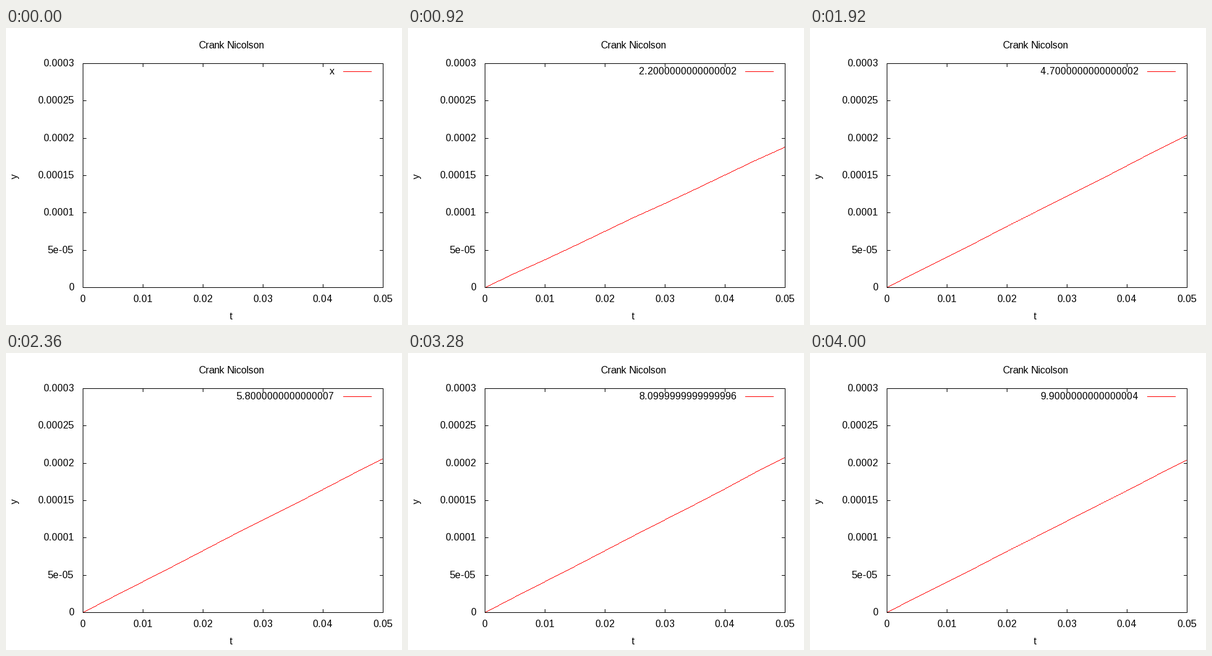
Recreate the animation shown at these times as a matplotlib script. Size 640 px wide and 480 px high, loop 4040 ms.

```python
import numpy as np
import matplotlib.pyplot as plt
from matplotlib.animation import FuncAnimation

W, H, DPI = 640, 480, 100
FRAMES, INTERVAL = 101, 40
LEFT, RIGHT, TOP, BOTTOM = 124, 609, 57, 419
PX = 72 / DPI  # one pixel in points
TICK = 5
SEGMENTS = 10

plt.rcParams.update({
    "font.family": "Liberation Sans",
    "text.hinting": "force_autohint",
    "text.hinting_factor": 1,
})
fig = plt.figure(figsize=(W / DPI, H / DPI), dpi=DPI, facecolor="white")
# Whole numbers are pixel centres, y runs down.
ax = fig.add_axes([0, 0, 1, 1])
ax.set_xlim(-0.5, W - 0.5)
ax.set_ylim(H - 0.5, -0.5)
ax.axis("off")


def line(x, y, color="black"):
    ax.plot(x, y, color=color, lw=PX, snap=False, zorder=3,
            solid_capstyle="projecting", solid_joinstyle="miter")


def label(x, y, s, ha="center", va="baseline", rotation=0):
    return ax.text(x - 0.5, y - 0.5, s, ha=ha, va=va, rotation=rotation,
                   fontsize=16 * PX, color="black")


def draw_axes():
    line([LEFT, RIGHT, RIGHT, LEFT, LEFT], [TOP, TOP, BOTTOM, BOTTOM, TOP])
    for i, s in enumerate(["0", "0.01", "0.02", "0.03", "0.04", "0.05"]):
        x = LEFT + 97 * i
        line([x, x], [BOTTOM, BOTTOM - TICK])
        line([x, x], [TOP, TOP + TICK])
        label(x, 443, s)
    y_names = ["0", "5e-05", "0.0001", "0.00015", "0.0002", "0.00025", "0.0003"]
    for i, s in enumerate(y_names):
        y = round(BOTTOM - (BOTTOM - TOP) * i / 6)
        line([LEFT, LEFT + TICK], [y, y])
        line([RIGHT, RIGHT - TICK], [y, y])
        label(110, y + 5, s, ha="right")
    label(364, 33, "Crank Nicolson")
    label(364, 471, "t")
    label(14, 240, "y", va="center", rotation=90)


def end_height(t):
    """Height in pixels of the line's right end at time t."""
    rise = 1 - np.exp(-t / 0.9)
    return rise * (248 + 2.6 * np.sin(2 * np.pi * (t - 7.45) / 2.7))


def time_text(t):
    s = f"{t:.17g}"
    return s if "." in s else s + ".0"


draw_axes()
line([545, 590], [70, 70], "red")
key = label(531, 75, "x", ha="right")

steps = np.arange(SEGMENTS + 1) / SEGMENTS
knots = np.round(LEFT + (RIGHT - LEFT) * steps)
cols = np.arange(LEFT, RIGHT + 1)
edges = np.arange(LEFT, RIGHT + 2) - 0.5
# A band one pixel high in every column keeps the line crisp.
curve = ax.stairs(cols * 0.0, edges, baseline=cols * 0.0 + 1, fill=True,
                  color="red", lw=0, snap=False, zorder=2)
ax.set_xlim(-0.5, W - 0.5)
ax.set_ylim(H - 0.5, -0.5)


def update(frame):
    curve.set_visible(frame > 0)
    if frame == 0:
        key.set_text("x")
    else:
        t = (frame - 1) * 0.1
        key.set_text(time_text(t))
        ys = np.round(BOTTOM - end_height(t) * steps)
        rows = np.round(np.interp(cols, knots, ys))
        curve.set_data(rows - 0.5, edges, rows + 0.5)
    return curve, key


anim = FuncAnimation(fig, update, frames=FRAMES, interval=INTERVAL,
                     init_func=lambda: update(0), repeat=True, repeat_delay=0)
plt.show()
```
